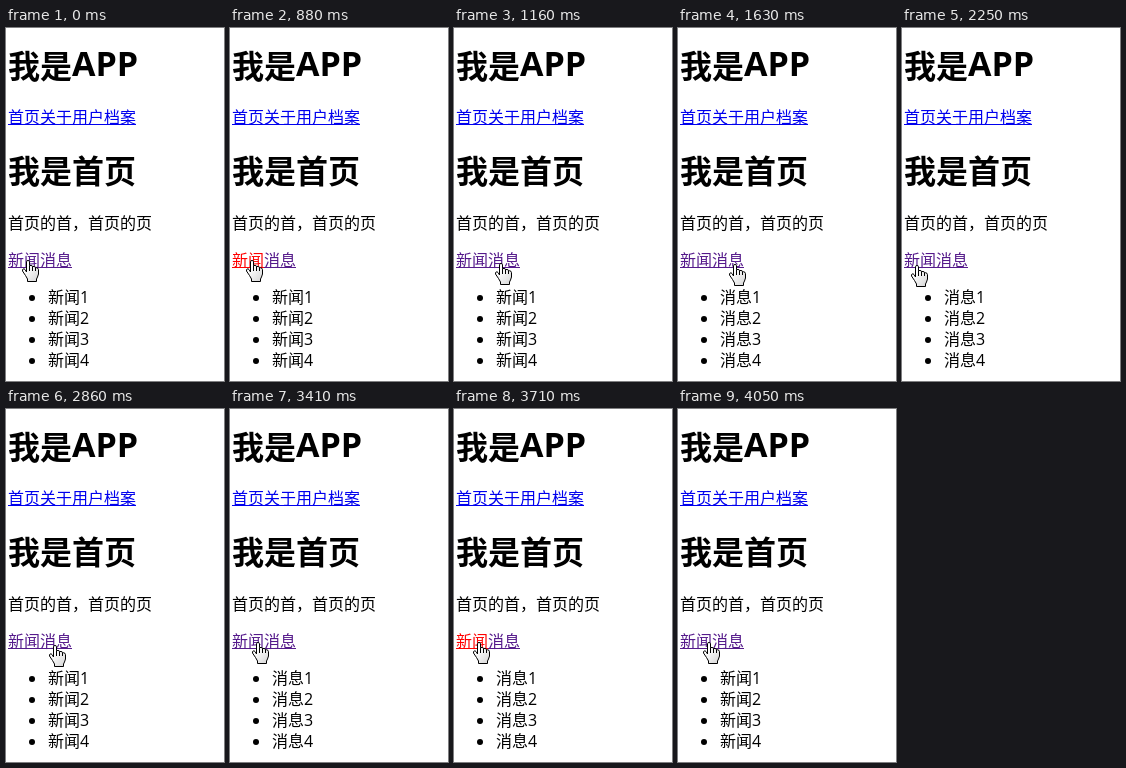
Animation of 218 by 353 pixels, one loop 4200 ms. Source, as an HTML page:

```html
<!DOCTYPE html>
<html lang="zh-CN">
<head>
<meta charset="utf-8">
<title>我是APP</title>
<style>
  html, body { margin: 0; width: 100%; height: 100%; overflow: hidden; background: #fff; }
  svg { display: block; font: 16px "Open Sans", "Noto Sans CJK SC", "Noto Sans CJK", sans-serif; }
  .title { font-size: 32px; font-weight: 700; }
  .latin { font-size: 34px; }
  .link { fill: #00e; }
  .visited { fill: #551a8b; }
  .active { fill: #f00; }
  rect { shape-rendering: crispEdges; }
</style>
</head>
<body>
<svg width="218" height="353" viewBox="0 0 218 353">
  <defs>
    <linearGradient id="shade" x1=".3" y1=".3" x2="1" y2="1">
      <stop offset="0" stop-color="#fff"/>
      <stop offset="1" stop-color="#d4d4d4"/>
    </linearGradient>
  </defs>
  <text class="title" x="2" y="50">我是<tspan class="latin" dy="-2">APP</tspan></text>
  <g class="link">
    <text x="2" y="95">首页关于用户档案</text>
    <rect x="2" y="96" width="128" height="1"/>
  </g>
  <text class="title" x="2" y="155">我是首页</text>
  <text x="2" y="201">首页的首，首页的页</text>
  <g class="visited tab">
    <text x="2" y="238">新闻</text>
    <rect x="2" y="239" width="32" height="1"/>
  </g>
  <g class="visited tab">
    <text x="34" y="238">消息</text>
    <rect x="34" y="239" width="32" height="1"/>
  </g>
  <g id="list"></g>
  <g id="hand" stroke="#000" stroke-linejoin="round">
    <path fill="url(#shade)" d="M4.5 12V1.7Q4.5 .5 6 .5T7.5 1.7V5.5H9Q10.5 5.5 10.5 6.5H12Q13.5 6.5 13.5 7.7H14.5Q16.5 8 16.5 9.7V14L15.5 17L14.5 19V21.5H5.5V19L3.5 15.5L.5 11Q0 9 2 8.7Q3 9 4.5 12Z"/>
    <path fill="none" d="M7.5 5.5V11M10.5 6.5V11M13.5 7.7V11"/>
  </g>
</svg>
<script>
const LOOP = 4200;
const STEP = 72;
const LABELS = ['新闻', '消息'];
const HOME = { x: 16, y: 232 };

// the pointer glides to each place in a few hard steps
const MOVES = [
  { at: 1160, steps: 3, x: 51, y: 236 },
  { at: 1880, steps: 4, x: 19, y: 240 },
  { at: 2170, steps: 2, x: 9, y: 237 },
  { at: 2570, steps: 5, x: 43, y: 236 },
  { at: 3250, steps: 6, x: 19, y: 233 },
  { at: 3950, steps: 2, x: 25, y: 233 }
];

// press and release; clicks alternate between the two tabs
const CLICKS = [[880, 930], [1460, 1630], [2400, 2490], [2950, 3070], [3710, 3790]];

const NS = 'http://www.w3.org/2000/svg';
const list = document.getElementById('list');
const hand = document.getElementById('hand');
const tabs = document.querySelectorAll('.tab');

const easeOut = u => 1 - (1 - u) ** 3;
const mix = (a, b, u) => Math.round(a + (b - a) * u);

function add(name, attrs) {
  const el = document.createElementNS(NS, name);
  for (const key in attrs) el.setAttribute(key, attrs[key]);
  return list.appendChild(el);
}

const items = [0, 1, 2, 3].map(i => {
  const y = 275 + i * 21;
  add('circle', { cx: 26, cy: y - 5, r: 3 });
  return add('text', { x: 42, y });
});

function pointer(t) {
  const i = MOVES.findLastIndex(m => m.at <= t);
  if (i < 0) return HOME;
  const from = MOVES[i - 1] || HOME;
  const to = MOVES[i];
  const step = Math.floor((t - to.at) / STEP) + 1;
  const u = easeOut(Math.min(1, step / to.steps));
  return { x: mix(from.x, to.x, u), y: mix(from.y, to.y, u) };
}

let shown = -1;

function draw(now) {
  const t = now % LOOP;
  const { x, y } = pointer(t);
  hand.setAttribute('transform', `translate(${x} ${y})`);

  const pressed = CLICKS.findIndex(([down, up]) => t >= down && t < up);
  tabs.forEach((tab, i) => tab.classList.toggle('active', pressed >= 0 && pressed % 2 === i));

  const last = CLICKS.findLastIndex(([, up]) => up <= t);
  const page = Math.max(0, last) % 2;
  if (page !== shown) {
    shown = page;
    items.forEach((item, i) => { item.textContent = LABELS[page] + (i + 1); });
  }
}

function tick(now) {
  draw(now);
  requestAnimationFrame(tick);
}

draw(0);
requestAnimationFrame(tick);
</script>
</body>
</html>
```
